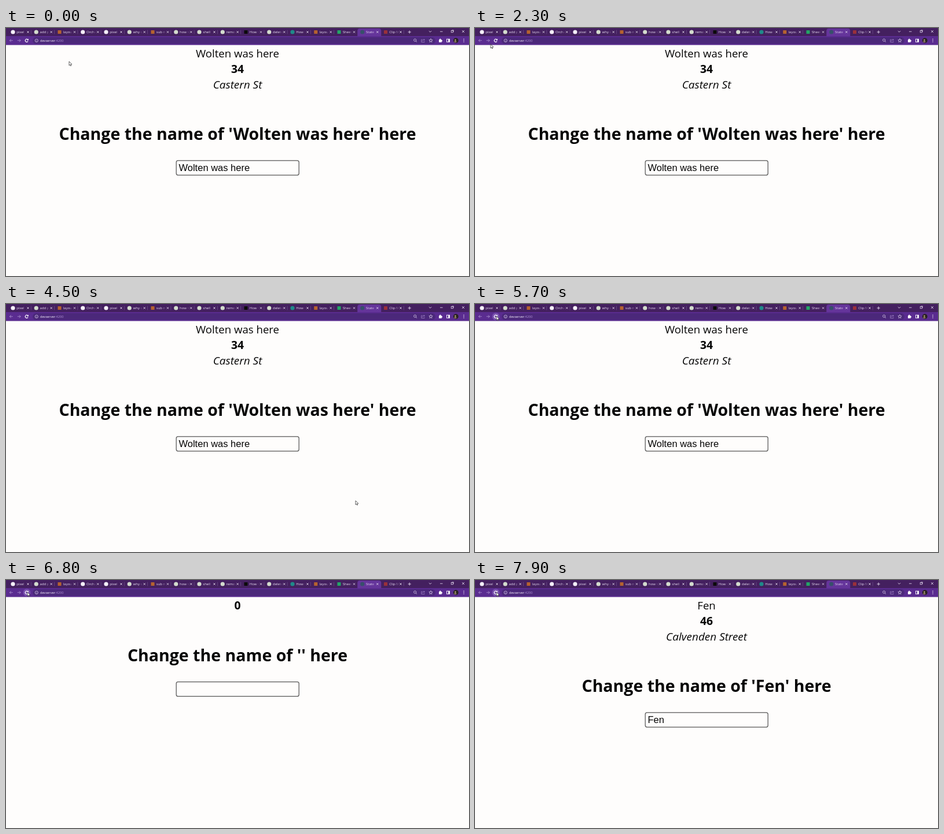
An HTML page with a canvas for the animation above (8 s loop, 800 px wide and 430 px high).

```html
<!DOCTYPE html>
<html lang="en">
<head>
<meta charset="utf-8">
<title>Name form</title>
<style>
  html, body { margin: 0; width: 100%; height: 100%; overflow: hidden; background: #fefdfc; }
  canvas { display: block; width: 800px; height: 430px; }
</style>
</head>
<body>
<canvas id="stage"></canvas>
<script>
const W = 800, H = 430, LOOP = 8000, STEP = 100;
const RELOAD = 6300, LOADED = 7700, HOVER = 5400;
const SANS = '"Open Sans", "Noto Sans", sans-serif';
const ARIAL = '"Liberation Sans", sans-serif';
const canvas = document.getElementById('stage');
const ctx = canvas.getContext('2d');
const dpr = window.devicePixelRatio || 1;
canvas.width = W * dpr;
canvas.height = H * dpr;

const C = { strip: '#44205f', bar: '#5a2c90', field: '#4b287a', active: '#65359b',
            ink: '#e9dff4', dim: '#a98dcc', page: '#fefdfc', text: '#050505' };

const TAB_STEP = 40.25, ACTIVE = 15;
const TITLES = ('pixel,add p,layou,Orcha,pixel,why ca,sub mo,how to,shell,remov,' +
                'How t,delete,How t,layou,Sheet,State,Clip M').split(',');
// one letter per tab: its icon kind
const KINDS = 'wgowwgoggg' + 'kgtoabr';
const ICONS = { w: '#f4eff8', g: '#d3dccd', o: '#b5622f', k: '#0b0b0b',
                t: '#1f8a8a', a: '#23a566', b: '#37506b', r: '#99303a' };

const FIRST = { name: 'Wolten was here', age: '34', street: 'Castern St' };
const EMPTY = { name: '', age: '0', street: '' };
const NEXT = { name: 'Fen', age: '46', street: 'Calvenden Street' };

// each stop: where the pointer rests, and when it sets off and arrives
const STOPS = [
  { x: 109, y: 58, leave: 0, arrive: 0 },
  { x: 27, y: 28, leave: 2200, arrive: 2300 },
  { x: 604, y: 341, leave: 2700, arrive: 3500 },
  { x: 37, y: 21, leave: 4800, arrive: HOVER }
];

function pointerAt(t) {
  return STOPS.reduce((p, s) => {
    const u = Math.min(1, Math.max(0, (t - s.leave) / (s.arrive - s.leave || 1)));
    const e = u * u * (3 - 2 * u);
    return { x: p.x + (s.x - p.x) * e, y: p.y + (s.y - p.y) * e };
  }, STOPS[0]);
}

function text(str, x, y, font, color, align = 'left') {
  ctx.font = font;
  ctx.fillStyle = color;
  ctx.textAlign = align;
  ctx.fillText(str, x, y);
}

function path(points, close) {
  ctx.beginPath();
  points.forEach(([x, y]) => ctx.lineTo(x, y));
  if (close) ctx.closePath();
}

function line(color, width, ...points) {
  path(points);
  ctx.strokeStyle = color;
  ctx.lineWidth = width;
  ctx.stroke();
}

function disc(x, y, r, color) {
  ctx.beginPath();
  ctx.arc(x, y, r, 0, Math.PI * 2);
  ctx.fillStyle = color;
  ctx.fill();
}

function ring(x, y, r, color, width, from = 0, to = Math.PI * 2) {
  ctx.beginPath();
  ctx.arc(x, y, r, from, to);
  ctx.strokeStyle = color;
  ctx.lineWidth = width;
  ctx.stroke();
}

function round(x, y, w, h, r, color) {
  ctx.beginPath();
  ctx.roundRect(x, y, w, h, r);
  ctx.fillStyle = color;
  ctx.fill();
}

function box(x, y, size, color, width) {
  ctx.strokeStyle = color;
  ctx.lineWidth = width;
  ctx.strokeRect(x, y, size, size);
}

function cross(x, y, r, color, width) {
  line(color, width, [x - r, y - r], [x + r, y + r]);
  line(color, width, [x + r, y - r], [x - r, y + r]);
}

function chevron(x, y, r, angle, color, width) {
  ctx.save();
  ctx.translate(x, y);
  ctx.rotate(angle);
  line(color, width, [-r, -r], [0, 0], [-r, r]);
  ctx.restore();
}

function drawTab(title, i) {
  const x = 12 + i * TAB_STEP, kind = KINDS[i];
  const back = i === ACTIVE ? C.active : C.strip;
  if (i === ACTIVE) round(x - 8.5, 1, 41, 14, [4, 4, 0, 0], C.active);
  if ('wgtb'.includes(kind)) disc(x, 7, 3.6, ICONS[kind]);
  else round(x - 3, 4, 6, 6, 0.5, ICONS[kind]);

  ctx.save();
  ctx.beginPath();
  ctx.rect(x + 5, 0, 17.5, 14);
  ctx.clip();
  text(title, x + 6.3, 9.2, `6px ${SANS}`, C.ink);
  const fade = ctx.createLinearGradient(x + 17, 0, x + 22, 0);
  fade.addColorStop(0, back + '00');
  fade.addColorStop(1, back);
  ctx.fillStyle = fade;
  ctx.fillRect(x + 17, 2, 6, 11);
  ctx.restore();

  cross(x + 26, 7, 1.6, '#f4eefa', 0.8);
  if (i !== ACTIVE && i !== ACTIVE - 1) line('#795b98', 0.6, [x + 31.3, 3.5], [x + 31.3, 10.5]);
}

function drawWindowButtons() {
  line(C.ink, 0.9, [694.6, 7], [699.8, 7]);
  line(C.ink, 0.9, [697.2, 4.4], [697.2, 9.6]);
  chevron(733, 7.2, 2.2, Math.PI / 2, C.ink, 0.8);
  line(C.ink, 0.8, [750, 6.2], [754.5, 6.2]);
  box(769.2, 4.6, 3.2, C.ink, 0.7);
  line(C.ink, 0.6, [770.3, 3.6], [773.4, 3.6], [773.4, 6.8]);
  cross(790, 6, 2, C.ink, 0.8);
}

function drawReload(hover) {
  if (hover) disc(36, 21.7, 6.4, '#7950ae');
  ring(35.8, 21.7, 2.5, '#fff', 1.1, 0.5, 5.5);
  path([[38.8, 18.4], [38.8, 21.4], [35.8, 21.4]], true);
  ctx.fillStyle = '#fff';
  ctx.fill();
}

function drawAddress() {
  round(46, 16, 696, 11.6, 5.8, C.field);
  ring(52.8, 21.8, 2.6, C.ink, 0.7);
  line(C.ink, 0.7, [52.8, 21.4], [52.8, 23.3]);
  const font = `5.7px ${SANS}`, host = 'devserver';
  text(host, 59, 24, font, '#f5effb');
  text(':4200', 59 + ctx.measureText(host).width, 24, font, '#b195d3');

  // zoom, share, bookmark
  ring(706.7, 21, 2.1, C.ink, 0.7);
  line(C.ink, 0.8, [708.2, 22.6], [710, 24.4]);
  line(C.dim, 0.7, [719.5, 20], [717.7, 20], [717.7, 24.5], [723, 24.5], [723, 23]);
  line(C.dim, 0.7, [719, 22.8], [720.5, 20.4], [723.2, 20.4]);
  chevron(723.4, 20.4, 1.6, 0, C.dim, 0.7);
  const star = Array.from({ length: 11 }, (_, i) => {
    const a = -Math.PI / 2 + i * Math.PI / 5, r = i % 2 ? 1.5 : 3.3;
    return [734 + r * Math.cos(a), 21.8 + r * Math.sin(a)];
  });
  line(C.ink, 0.7, ...star);
}

function drawToolbar(hover) {
  ctx.fillStyle = C.bar;
  ctx.fillRect(0, 14, W, 15.5);
  for (const [x, d] of [[9, -1], [22.5, 1]]) {
    line(C.dim, 0.9, [x - 2.7, 21.7], [x + 2.7, 21.7]);
    chevron(x + d * 2.7, 21.7, 2.4, d < 0 ? Math.PI : 0, C.dim, 0.9);
  }
  drawAddress();
  drawReload(hover);

  // extensions, side panel, profile, menu
  round(748, 20, 4.8, 4.8, 0.5, '#fff');
  disc(750.3, 19.7, 1.1, '#fff');
  disc(753, 22.3, 1.1, '#fff');
  box(761.5, 19.2, 5, '#fff', 0.9);
  ctx.fillRect(764.2, 19.2, 2.3, 5);
  disc(777.3, 21.7, 4.4, '#27211f');
  disc(776.4, 20.8, 1.4, '#b39a80');
  round(774.4, 22.5, 4, 2.6, 1.2, '#8f7d64');
  for (let i = -1; i <= 1; i++) disc(791, 21.7 + i * 2.4, 0.7, '#fff');
}

function drawPage({ name, age, street }) {
  const shift = name ? 0 : -53.3;
  const put = (str, y, font) => text(str, W / 2, y, font, C.text, 'center');
  put(name, 51, `18.6px ${SANS}`);
  put(age, name ? 78 : 51, `bold 19.3px ${SANS}`);
  put(street, 104.5, `italic 19px ${SANS}`);
  put(`Change the name of '${name}' here`, 194 + shift, `bold 28.5px ${SANS}`);

  round(294.2, 229.9 + shift, 212, 25.1, 3, C.page);
  ctx.strokeStyle = '#555';
  ctx.lineWidth = 1.25;
  ctx.stroke();
  text(name, 298.5, 248 + shift, `16.5px ${ARIAL}`, C.text);
}

function drawPointer({ x, y }) {
  ctx.save();
  ctx.translate(x, y);
  path([[0, 0], [0, 7], [1.6, 5.6], [2.6, 7.8], [3.7, 7.3], [2.7, 5.1], [4.9, 5]], true);
  ctx.fillStyle = '#fff';
  ctx.fill();
  ctx.strokeStyle = '#222';
  ctx.lineWidth = 0.7;
  ctx.stroke();
  ctx.restore();
}

function draw(t) {
  ctx.setTransform(dpr, 0, 0, dpr, 0, 0);
  ctx.fillStyle = C.page;
  ctx.fillRect(0, 0, W, H);
  ctx.fillStyle = C.strip;
  ctx.fillRect(0, 0, W, 14);
  TITLES.forEach(drawTab);
  drawWindowButtons();
  drawToolbar(t >= HOVER);
  drawPage(t < RELOAD ? FIRST : t < LOADED ? EMPTY : NEXT);
  drawPointer(pointerAt(t));
}

const start = performance.now();
function tick() {
  const t = (performance.now() - start) % LOOP;
  draw(Math.floor(t / STEP) * STEP);
  requestAnimationFrame(tick);
}
tick();
</script>
</body>
</html>
```
